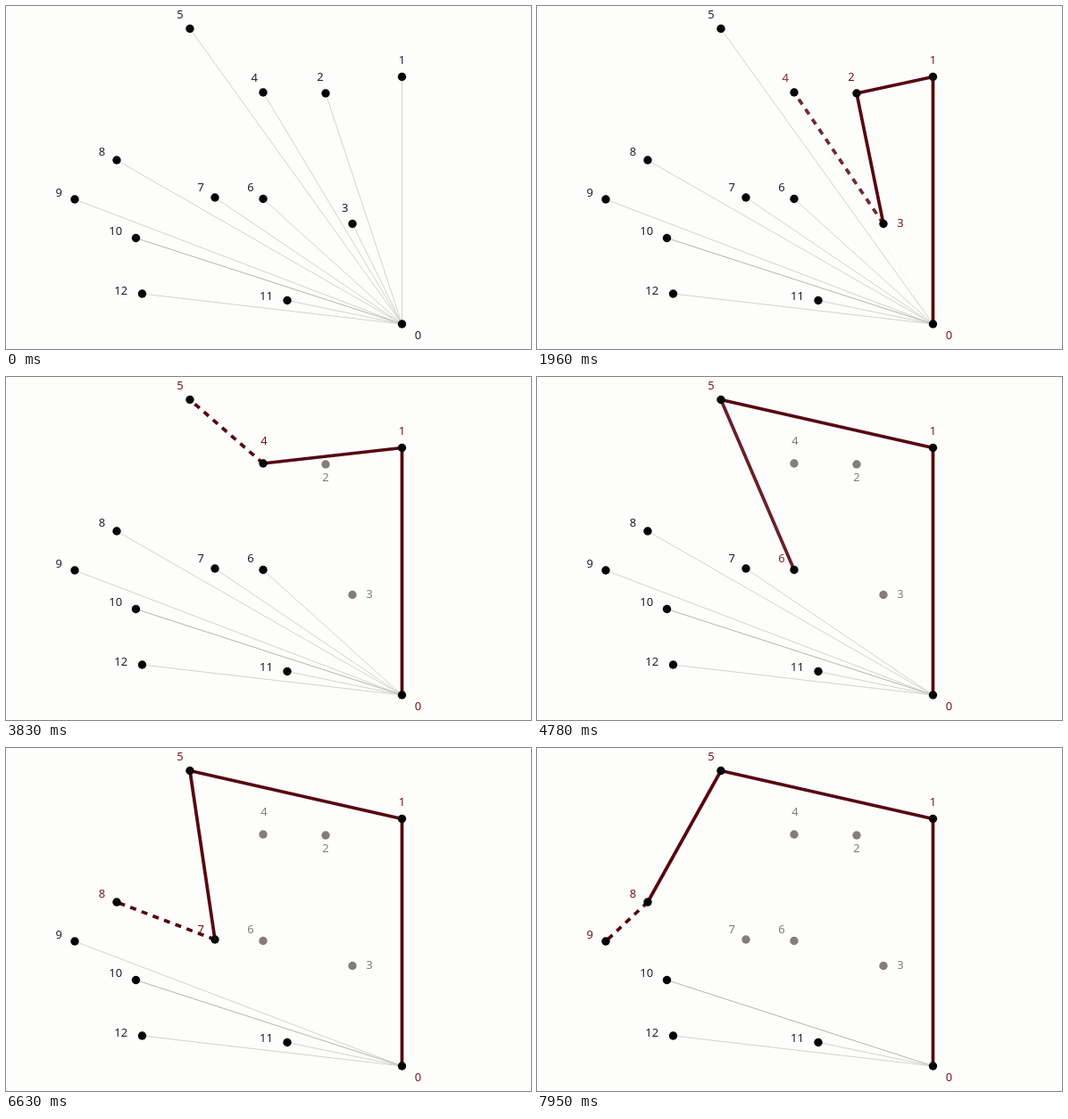
Animation of 588 by 385 pixels, one loop 8000 ms. Source, as an HTML page with a canvas:

```html
<!DOCTYPE html>
<html lang="en">
<head>
<meta charset="utf-8">
<title>Convex hull scan</title>
<style>
  html, body { margin: 0; width: 100%; height: 100%; overflow: hidden; background: #fdfdfc; }
  canvas { display: block; width: 588px; height: 385px; }
</style>
</head>
<body>
<canvas></canvas>
<script>
const WIDTH = 588, HEIGHT = 385, LOOP = 8000;
const FIRST_STEP = 170, BEAT = 563, FADE = 120;
const BLACK = '#050505', INK = '#20202c', GREY = '#837d7c', RED = '#560610', RED_INK = '#74141f';

// Sorted by angle around the pivot, which comes first
const points = [
  [443.5, 357], [443.5, 79.5], [358, 98], [388, 244.5], [288, 97], [206, 25.5], [288, 216.5],
  [234, 215], [124, 173], [77, 217], [145.5, 260.5], [315, 330.5], [152.5, 323]
].map(([x, y]) => ({ x, y }));
const pivot = points[0];

// Labels that step aside for a hull edge
const asides = {
  0: { step: 0, dx: 18, dy: 13 },
  2: { step: 6, dx: 0, dy: 15 },
  3: { step: 3, dx: 19, dy: -1 },
  4: { step: 6, dx: 1, dy: -25 }
};

// Graham scan: a chain that ends in a wrong turn loses its last but one point
function scan() {
  const steps = [{ chain: [] }, { chain: [0, 1] }];
  let chain = [0, 1];
  const turnsWrong = () => {
    const [a, b, c] = chain.slice(-3).map(i => points[i]);
    return (b.x - a.x) * (c.y - b.y) > (b.y - a.y) * (c.x - b.x);
  };
  for (let i = 2; i < points.length; i++) {
    chain = [...chain, i];
    while (turnsWrong()) {
      steps.push({ chain, wrong: true });
      chain = [...chain.slice(0, -2), i];
    }
    steps.push({ chain });
  }
  return steps;
}

const canvas = document.querySelector('canvas');
const ctx = canvas.getContext('2d');
const scale = window.devicePixelRatio || 1;
canvas.width = WIDTH * scale;
canvas.height = HEIGHT * scale;
ctx.scale(scale, scale);
ctx.font = '500 13px "Noto Sans", "Open Sans", sans-serif';
ctx.textAlign = 'center';

function line(a, b, color, width, dash = []) {
  ctx.strokeStyle = color;
  ctx.lineWidth = width;
  ctx.setLineDash(dash);
  ctx.beginPath();
  ctx.moveTo(points[a].x, points[a].y);
  ctx.lineTo(points[b].x, points[b].y);
  ctx.stroke();
}

function dot(i, color) {
  ctx.fillStyle = color;
  ctx.beginPath();
  ctx.arc(points[i].x, points[i].y, 4.7, 0, Math.PI * 2);
  ctx.fill();
}

function label(i, color, dx, dy) {
  ctx.fillStyle = color;
  ctx.fillText(i, points[i].x + dx, points[i].y + dy + 4);
}

// Labels sit outward from the pivot, two digits a little further
function labelOffset(i, step) {
  const aside = asides[i];
  if (aside && step >= aside.step) return [aside.dx, aside.dy];
  const angle = Math.atan2(points[i].y - pivot.y, points[i].x - pivot.x);
  const reach = i > 9 ? 24 : 19;
  return [reach * Math.cos(angle), reach * Math.sin(angle)];
}

// Everything visible in one step, back to front
function scene({ chain, wrong }, step) {
  const items = [];
  const add = (layer, paint, ...args) =>
    items.push({ layer, paint, args, key: [layer, ...args].join() });
  const last = chain.length ? chain[chain.length - 1] : 0;

  points.forEach((_, i) => {
    if (i > last) add(0, line, 0, i, i === 10 ? '#b4b6b2' : '#d2d5cf', 1);
    const inChain = chain.includes(i);
    const rejected = !inChain && i < last;
    add(2, dot, i, rejected ? GREY : BLACK);
    add(3, label, i, rejected ? GREY : inChain ? RED_INK : INK, ...labelOffset(i, step));
  });
  chain.slice(1).forEach((to, k) =>
    add(1, line, chain[k], to, RED, 3.7, wrong && to === last ? [7, 6.5] : []));
  return items;
}

const scenes = scan().map(scene);

function draw(time) {
  const index = Math.max(0, Math.floor((time - FIRST_STEP) / BEAT) + 1);
  const elapsed = time - FIRST_STEP - (index - 1) * BEAT;
  const mix = Math.min(1, elapsed / FADE);
  const now = scenes[index], before = scenes[Math.max(0, index - 1)];
  const without = (list, other) => list.filter(a => !other.some(b => a.key === b.key));
  const added = without(now, before);

  const entries = [
    ...without(before, now).map(item => ({ ...item, alpha: 1 - mix })),
    ...now.map(item => ({ ...item, alpha: added.includes(item) ? mix : 1 }))
  ].sort((a, b) => a.layer - b.layer);

  ctx.globalAlpha = 1;
  ctx.fillStyle = '#fdfdfc';
  ctx.fillRect(0, 0, WIDTH, HEIGHT);
  for (const { paint, args, alpha } of entries) {
    ctx.globalAlpha = alpha;
    paint(...args);
  }
}

const origin = performance.now();
function frame() {
  draw((performance.now() - origin) % LOOP);
  requestAnimationFrame(frame);
}
frame();
</script>
</body>
</html>
```
